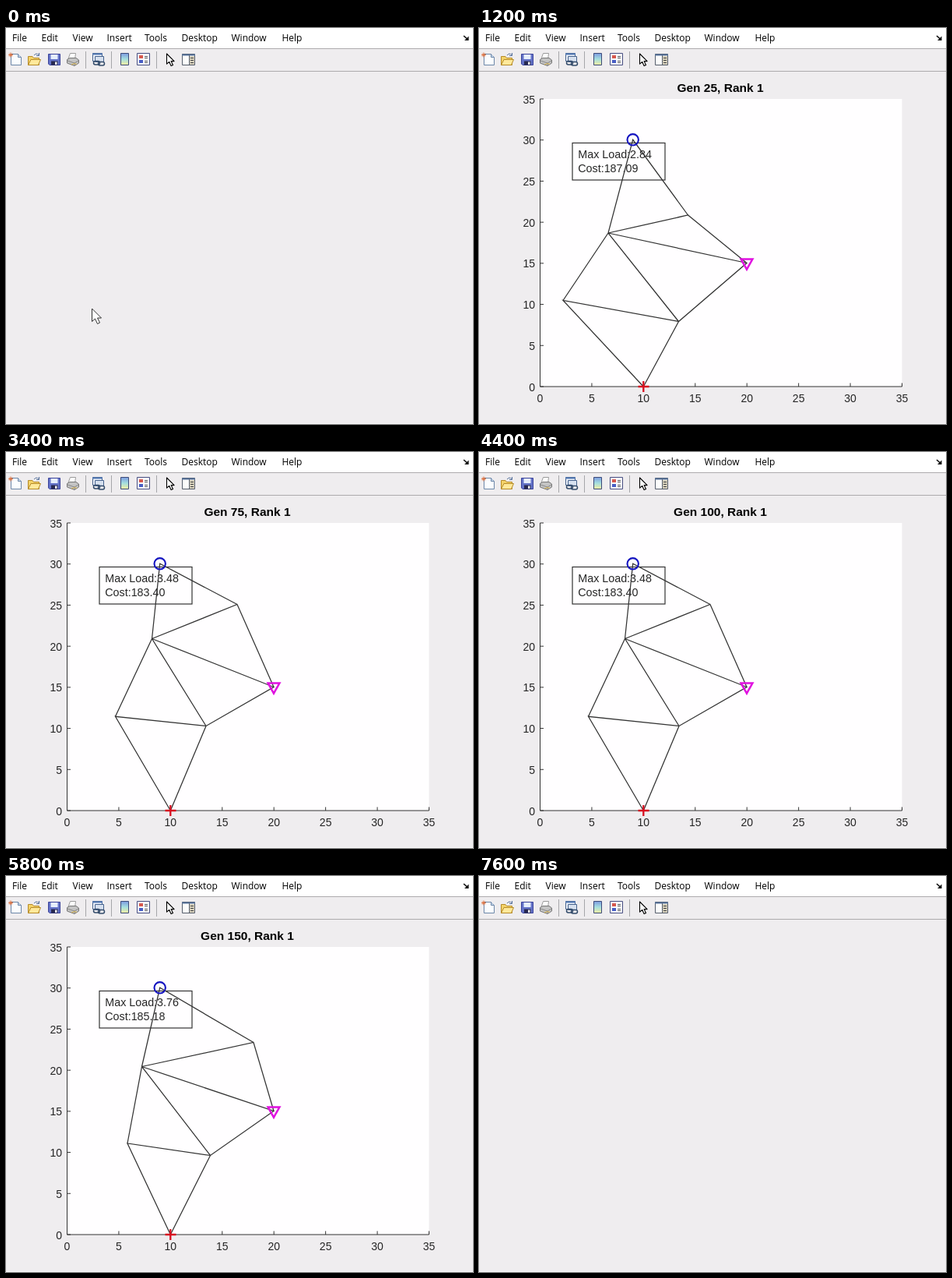
Recreate the animation shown at these times as an HTML page. Size 600 by 508 pixels, loop 8 s.

```html
<!DOCTYPE html>
<html lang="en">
<head>
<meta charset="utf-8">
<title>Truss optimisation</title>
<style>
  html, body { margin: 0; width: 100%; height: 100%; overflow: hidden; background: #efedef; }
  svg { display: block; width: 600px; height: 508px; }
  .menu { font: 12px "Open Sans", "Noto Sans", sans-serif; fill: #000; }
  .plot { font: 14px "Liberation Sans", Arial, sans-serif; fill: #262626; }
  .note { font-size: 14.3px; }
  .title { font-size: 15.5px; font-weight: bold; fill: #000; text-anchor: middle; }
  .middle { text-anchor: middle; }
  .end { text-anchor: end; }
</style>
</head>
<body>
<svg viewBox="0 0 600 508">
  <defs>
    <linearGradient id="bar" x2="0" y2="1">
      <stop offset="0" stop-color="#7d9be0"/><stop offset=".5" stop-color="#a5dfdf"/><stop offset="1" stop-color="#f3efa0"/>
    </linearGradient>
    <path id="pointer" d="M0 0V16.5L4 13L7 19.5L10 18L7 12H12Z" fill="#fff"/>
  </defs>
  <rect width="600" height="508" fill="#efedef"/>
  <rect width="600" height="26" fill="#fff"/>
  <path d="M0 26.5H600M0 55.5H600" stroke="#adabad"/>
  <path d="M0 507.5H600" stroke="#fafafa"/>
  <g class="menu" id="menu"></g>
  <path d="M588 10L592.5 14" stroke="#111" stroke-width="1.6"/>
  <path d="M594.5 10.5V16H589Z" fill="#111"/>

  <g stroke-linejoin="round">
    <path d="M102.5 30V52M135.5 30V52M193.5 30V52" stroke="#a6a6aa"/>
    <!-- new -->
    <path d="M6.5 33.5H15.5L19.5 37.5V47.5H6.5Z" fill="#fbfdff" stroke="#6c87a8"/>
    <path d="M15.5 33.5V37.5H19.5" fill="#c9d9ec" stroke="#6c87a8"/>
    <path d="M3 34.5H9M6 31.5V37.5M4 32.5L8 36.5M8 32.5L4 36.5" stroke="#e0703c"/>
    <!-- open -->
    <path d="M28.5 47.5V36.5H34L35.5 38.5H42.5V47.5Z" fill="#f4d36a" stroke="#b58a28"/>
    <path d="M28.5 47.5L32 40.5H44.5L41.5 47.5Z" fill="#ffe99a" stroke="#b58a28"/>
    <path d="M36 35Q39 31.5 42 34.5M42.5 32V35.5H39" fill="none" stroke="#55709c"/>
    <!-- save -->
    <path d="M54.5 33.5H69.5V47.5H56L54.5 46Z" fill="#6473c8" stroke="#3a429a"/>
    <path d="M57.5 34H66.5V40H57.5Z" fill="#e6eefc"/>
    <path d="M58 42.5H66.5V47.5H58Z" fill="#26284f"/>
    <path d="M63 43.5H65.5V47H63Z" fill="#eee"/>
    <!-- print -->
    <path d="M80 39.5L82.5 32.5H89.5L88.5 40Z" fill="#fff" stroke="#9a9a9a"/>
    <path d="M78.5 40.5L82 38.5H90L93.5 41V45L88 48.5L78.5 45Z" fill="#c4c4c4" stroke="#777"/>
    <path d="M79 42L88 45L93 42M88 45V48" fill="none" stroke="#888"/>
    <path d="M84 47L88 45.5L91 46.5" stroke="#d9b44e" fill="none"/>
    <!-- link -->
    <path d="M111.5 32.5H123.5V42.5H111.5Z" fill="#eef3fb" stroke="#45618c"/>
    <path d="M111 33.5H124" stroke="#557bb5" stroke-width="2"/>
    <path d="M114.5 36.5H125.5V43.5H114.5Z" fill="#d7e1ef" stroke="#45618c"/>
    <g fill="none" stroke="#344c6b" stroke-width="1.5">
      <rect x="112.5" y="42.5" width="8" height="4.5" rx="2.2"/><rect x="118.5" y="43.5" width="8" height="4.5" rx="2.2"/>
    </g>
    <!-- colorbar -->
    <rect x="147.5" y="32.5" width="10" height="15" fill="url(#bar)" stroke="#3c4b78"/>
    <!-- legend -->
    <rect x="168.5" y="32.5" width="16" height="15" fill="#fafbff" stroke="#464d80"/>
    <path d="M171 35H176V39H171Z" fill="#d6584e"/><path d="M171 41H176V45H171Z" fill="#4a5fc5"/>
    <path d="M178 36.5H182M178 38.5H182M178 42.5H182M178 44.5H182" stroke="#555"/>
    <use href="#pointer" transform="translate(206.5 33) scale(.8)" stroke="#000" stroke-width="1.4"/>
    <!-- inspector -->
    <rect x="226.5" y="33.5" width="16" height="14" fill="#fcfcfc" stroke="#555d6b"/>
    <path d="M226 34.5H243" stroke="#557099" stroke-width="2"/>
    <path d="M235.5 35V47" stroke="#555d6b"/><path d="M236 36H242V47H236Z" fill="#d8d2bd"/>
    <path d="M237 38.5H241M237 41.5H241M237 44.5H241" stroke="#444"/>
  </g>

  <use id="cursor" href="#pointer" x="110.5" y="360" stroke="#333"/>

  <g id="figure" class="plot" display="none">
    <rect x="78" y="91" width="465.5" height="369" fill="#fffeff"/>
    <path id="axes" fill="none" stroke="#333"/>
    <g id="labels"></g>
    <text id="title" class="title" x="310" y="82.4"></text>
    <rect x="120" y="147.5" width="119" height="47.5" fill="none" stroke="#333" stroke-width="1.2"/>
    <text id="load" class="note" x="127.3" y="167"></text>
    <text id="cost" class="note" x="127.3" y="185"></text>
    <path id="truss" fill="none" stroke="#333" stroke-width="1.25"/>
    <circle cx="197.7" cy="143.3" r="7.2" fill="none" stroke="#1414c0" stroke-width="2.1"/>
    <path d="M204.5 460H218.5M211.3 453V467" stroke="#d81020" stroke-width="2.3"/>
    <path d="M336.6 296.6H351.4L344 309.6Z" fill="none" stroke="#e010e0" stroke-width="2.5"/>
  </g>
</svg>
<script>
const LOOP = 8000, CURSOR_GONE = 200, CLEARED = 7600;
const $ = id => document.getElementById(id);
const label = (x, y, text, cls = '') => `<text x="${x}" y="${y}" class="${cls}">${text}</text>`;

const menuItems = { File: 8, Edit: 45.5, View: 85.5, Insert: 129.5, Tools: 178, Desktop: 225.5, Window: 289.5, Help: 354.5 };
$('menu').innerHTML = Object.entries(menuItems).map(([name, x]) => label(x, 17, name)).join('');

// Axes run from 0 to 35 in both directions.
let axes = 'M78.5 91V460H543.5', labels = '';
for (let v = 0; v <= 35; v += 5) {
  const x = 78.5 + v * 465 / 35, y = 460 - v * 369 / 35;
  axes += `M${x} 460v-4.5M78.5 ${y}h4.5`;
  labels += label(x, 480, v, 'middle') + label(72, y + 5.5, v, 'end');
}
$('axes').setAttribute('d', axes);
$('labels').innerHTML = labels;

const base = [211.3, 460], tip = [197.7, 143.3], side = [344, 301.5];

// Free nodes: left, right, upper left, upper right.
const designs = {
  early:  { load: '2.84', cost: '187.09', nodes: [[108, 349.5], [256.5, 376.5], [166, 263], [268.5, 240]] },
  middle: { load: '3.48', cost: '183.40', nodes: [[140.5, 339.3], [257, 351.5], [187.5, 239.5], [297, 195.5]] },
  wide:   { load: '3.55', cost: '185.40', nodes: [[120, 384], [254, 356.5], [188.5, 246], [298.5, 213]] },
  late:   { load: '3.76', cost: '185.18', nodes: [[156, 343], [262.5, 358.5], [174.5, 244.5], [318, 213.5]] }
};

// Start time, generation, design
const schedule = [
  [1200, 25, 'early'], [2200, 50, 'middle'], [3000, 75, 'middle'], [3800, 100, 'middle'],
  [4800, 125, 'wide'], [5600, 150, 'late'], [6400, 175, 'late'], [7200, 200, 'late']
];

function trussPath([left, right, upperLeft, upperRight]) {
  const strips = [
    [base, left, right, base], [left, upperLeft, right, side, upperLeft],
    [upperLeft, upperRight, side], [upperLeft, tip, upperRight]
  ];
  return strips.map(points => 'M' + points.join('L')).join('');
}

let shown;
function draw(now) {
  const t = now % LOOP;
  $('cursor').setAttribute('display', t < CURSOR_GONE ? 'inline' : 'none');
  const step = t < CLEARED ? schedule.findLast(([start]) => t >= start) : undefined;
  $('figure').setAttribute('display', step ? 'inline' : 'none');
  if (step && step !== shown) {
    const [, generation, name] = step, { load, cost, nodes } = designs[name];
    $('title').textContent = `Gen ${generation}, Rank 1`;
    $('load').textContent = `Max Load:${load}`;
    $('cost').textContent = `Cost:${cost}`;
    $('truss').setAttribute('d', trussPath(nodes));
  }
  shown = step;
}

const began = performance.now();
function tick() {
  draw(performance.now() - began);
  requestAnimationFrame(tick);
}
tick();
</script>
</body>
</html>
```
